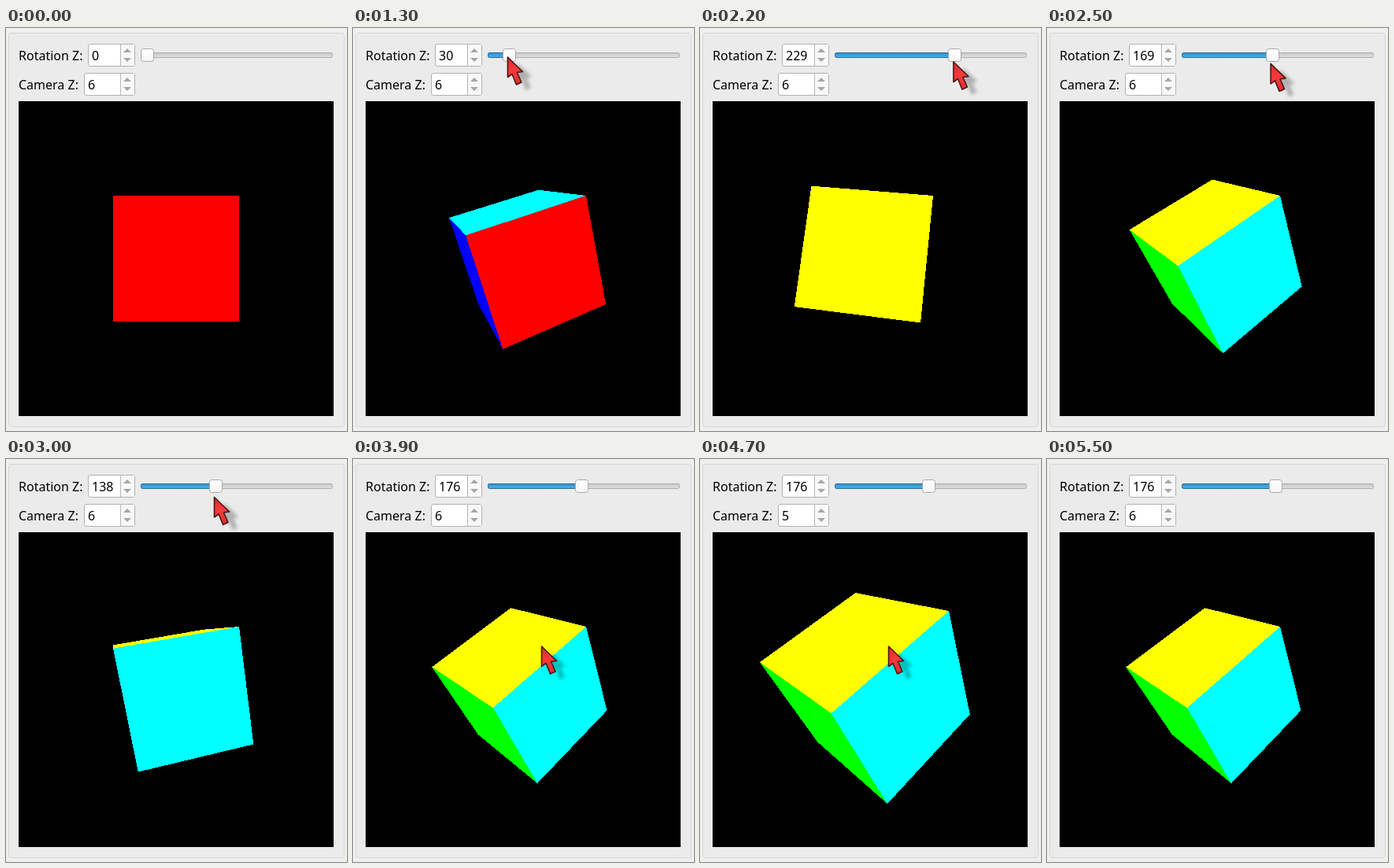
An HTML page with a canvas that plays this animation: 433 by 512 pixels, repeating every 6500 ms.

```html
<!DOCTYPE html>
<html lang="en">
<head>
<meta charset="utf-8">
<title>Rotating cube</title>
<style>
  html, body { margin: 0; width: 100%; height: 100%; overflow: hidden; background: #efefef; }
  canvas, svg { position: absolute; left: 0; top: 0; display: block; }
  text { font: 16px "Noto Sans", sans-serif; fill: #000; }
</style>
</head>
<body>
<canvas id="stage" width="433" height="512"></canvas>
<svg width="433" height="512">
  <text x="16" y="41">Rotation Z:</text>
  <text x="16" y="78">Camera Z:</text>
  <text id="angle" x="109" y="41">0</text>
  <text id="camera" x="104" y="78">6</text>
</svg>
<script>
const ctx = document.getElementById('stage').getContext('2d');
const angleText = document.getElementById('angle');
const cameraText = document.getElementById('camera');

const LOOP = 6500, TICK = 100;
const VIEW = { x: 16, y: 93, size: 400 };
const FOCAL = 400;

// Faces: axis, side, colour
const FACES = [
  [0, 1, '#ffff00'], [0, -1, '#0000ff'],
  [1, 1, '#00ffff'], [1, -1, '#ff00ff'],
  [2, 1, '#ff0000'], [2, -1, '#00ff00']
];

// Time, value
const ANGLE = [[1200, 0], [1300, 30], [1400, 57], [1800, 190], [1900, 214], [2000, 222],
  [2200, 229], [2300, 222], [2400, 200], [2600, 138], [2700, 107], [2800, 107],
  [3000, 138], [3100, 157], [3200, 170], [3300, 176]];
const CAMERA = [[4000, 6], [4100, 5], [4200, 3], [4300, 2], [4500, 2], [4600, 4], [4700, 5],
  [4800, 5], [4900, 6]];
const DRAG_Y = [[1200, 34.5], [1300, 37], [2200, 43], [2700, 47], [3000, 48.5]];

const mix = (a, b, p) => a + (b - a) * p;
const smooth = p => p * p * (3 - 2 * p);

function track(keys, t) {
  if (t <= keys[0][0]) return keys[0][1];
  for (let i = 1; i < keys.length; i++) {
    const [t0, a] = keys[i - 1], [t1, b] = keys[i];
    if (t <= t1) return mix(a, b, (t - t0) / (t1 - t0));
  }
  return keys[keys.length - 1][1];
}

const handleX = angle => 179.5 + angle * 227 / 360;

function pointerAt(t, angle) {
  if (t < 300 || t >= 5500) return null;
  const grip = [handleX(angle) - 2, track(DRAG_Y, t)];
  const rest = [239.5, 238];
  const glide = (a, b, t0, t1) => {
    const p = smooth(Math.min(1, Math.max(0, (t - t0) / (t1 - t0))));
    return [mix(a[0], b[0], p), mix(a[1], b[1], p)];
  };
  if (t < 1300) return glide([348.5, 86.5], [176.5, 34.5], 300, 900);
  if (t < 3600) return grip;
  if (t < 5200) return glide(grip, rest, 3600, 3900);
  return glide(rest, [285.5, 258], 5200, 5400);
}

function box(x, y, w, h, r, fill, stroke) {
  ctx.beginPath();
  ctx.roundRect(x + .5, y + .5, w - 1, h - 1, r);
  ctx.fillStyle = fill;
  ctx.fill();
  ctx.strokeStyle = stroke;
  ctx.lineWidth = 1;
  ctx.stroke();
}

function shade(y0, y1, from, to) {
  const g = ctx.createLinearGradient(0, y0, 0, y1);
  g.addColorStop(0, from);
  g.addColorStop(1, to);
  return g;
}

function path(points, dx = 0, dy = 0) {
  ctx.beginPath();
  for (const [x, y] of points) ctx.lineTo(x + dx, y + dy);
  ctx.closePath();
}

function spinBox(x, y) {
  box(x, y, 164 - x, 29, 2.5, '#ffffff', '#b2b2b2');
  ctx.fillStyle = '#f8f8f8';
  ctx.fillRect(146, y + 1, 17, 27);
  ctx.fillStyle = '#b8b8b8';
  ctx.fillRect(145, y + 1, 1, 27);
  ctx.fillStyle = '#a6a6a6';
  path([[149, y + 11], [159, y + 11], [154, y + 6]]);
  ctx.fill();
  path([[149, y + 18], [159, y + 18], [154, y + 23]]);
  ctx.fill();
}

function slider(angle) {
  const x = handleX(angle);
  box(171, 31, 244, 7, 2, shade(31, 38, '#c6c6c6', '#e2e2e2'), '#adadad');
  if (angle > 0) box(171, 31, x - 171, 7, 2, shade(31, 38, '#2f8dcb', '#4db3f0'), '#2b6c9b');
  box(Math.round(x - 8.5), 26, 17, 17, 3, shade(26, 43, '#ffffff', '#f5f5f5'), '#a8a8a8');
}

// Hard-edged fill of a convex polygon
function fillHard(points, color) {
  ctx.fillStyle = color;
  const ys = points.map(p => p[1]);
  const top = Math.max(VIEW.y, Math.ceil(Math.min(...ys) - .5));
  const end = Math.min(VIEW.y + VIEW.size, Math.ceil(Math.max(...ys) - .5));
  for (let y = top; y < end; y++) {
    const xs = [];
    points.forEach(([x0, y0], i) => {
      const [x1, y1] = points[(i + 1) % points.length];
      const m = y + .5;
      if ((y0 <= m) !== (y1 <= m)) xs.push(mix(x0, x1, (m - y0) / (y1 - y0)));
    });
    const left = Math.max(VIEW.x, Math.ceil(Math.min(...xs) - .5));
    const right = Math.min(VIEW.x + VIEW.size, Math.ceil(Math.max(...xs) - .5));
    if (right > left) ctx.fillRect(left, y, right - left, 1);
  }
}

// Rotation about the (1, 1, 1) diagonal
function rotate([x, y, z], angle) {
  const a = angle * Math.PI / 180;
  const c = Math.cos(a), s = Math.sin(a) / Math.sqrt(3);
  const k = (x + y + z) * (1 - c) / 3;
  return [x * c + (z - y) * s + k, y * c + (x - z) * s + k, z * c + (y - x) * s + k];
}

function cube(angle, camera) {
  ctx.fillStyle = '#000';
  ctx.fillRect(VIEW.x, VIEW.y, VIEW.size, VIEW.size);
  const mid = VIEW.size / 2;
  const project = v => {
    const [x, y, z] = rotate(v, angle);
    const scale = FOCAL / (camera - z);
    return [VIEW.x + mid + x * scale, VIEW.y + mid - y * scale];
  };
  for (const [axis, side, color] of FACES) {
    const normal = [0, 0, 0];
    normal[axis] = side;
    if (rotate(normal, angle)[2] * camera <= 1 + 1e-9) continue;
    const corners = [[1, 1], [-1, 1], [-1, -1], [1, -1]].map(([p, q]) => {
      const v = normal.slice();
      v[(axis + 1) % 3] = p;
      v[(axis + 2) % 3] = q;
      return project(v);
    });
    fillHard(corners, color);
  }
}

const ARROW = [[0, 0], [0, 25.5], [5.5, 21.5], [11, 35], [17.5, 32], [12, 19.5], [19, 18.5]];

function pointer([x, y]) {
  ctx.save();
  ctx.lineJoin = 'round';
  path(ARROW, x, y);
  ctx.shadowColor = 'rgba(0,0,0,.25)';
  ctx.shadowBlur = 4;
  ctx.shadowOffsetX = 12;
  ctx.shadowOffsetY = 7;
  const g = ctx.createLinearGradient(x, y, x + 14, y + 32);
  g.addColorStop(0, '#d82a2a');
  g.addColorStop(.5, '#f53a3a');
  g.addColorStop(1, '#e03030');
  ctx.fillStyle = g;
  ctx.fill();
  ctx.shadowColor = 'transparent';
  ctx.strokeStyle = '#4a1616';
  ctx.lineWidth = 1.6;
  ctx.stroke();
  ctx.restore();
}

function draw(now) {
  const t = Math.floor((now % LOOP) / TICK) * TICK;
  const angle = Math.round(track(ANGLE, t));
  const camera = Math.round(track(CAMERA, t));
  ctx.fillStyle = '#efefef';
  ctx.fillRect(0, 0, 433, 512);
  box(3, 6, 427, 501, 3, '#ebebeb', '#d6d6d6');
  spinBox(104, 20);
  spinBox(99, 57);
  slider(angle);
  cube(angle, camera);
  const tip = pointerAt(t, angle);
  if (tip) pointer(tip);
  angleText.textContent = angle;
  cameraText.textContent = camera;
}

let start;
function frame(now) {
  start ??= now;
  draw(now - start);
  requestAnimationFrame(frame);
}
draw(0);
requestAnimationFrame(frame);
</script>
</body>
</html>
```
